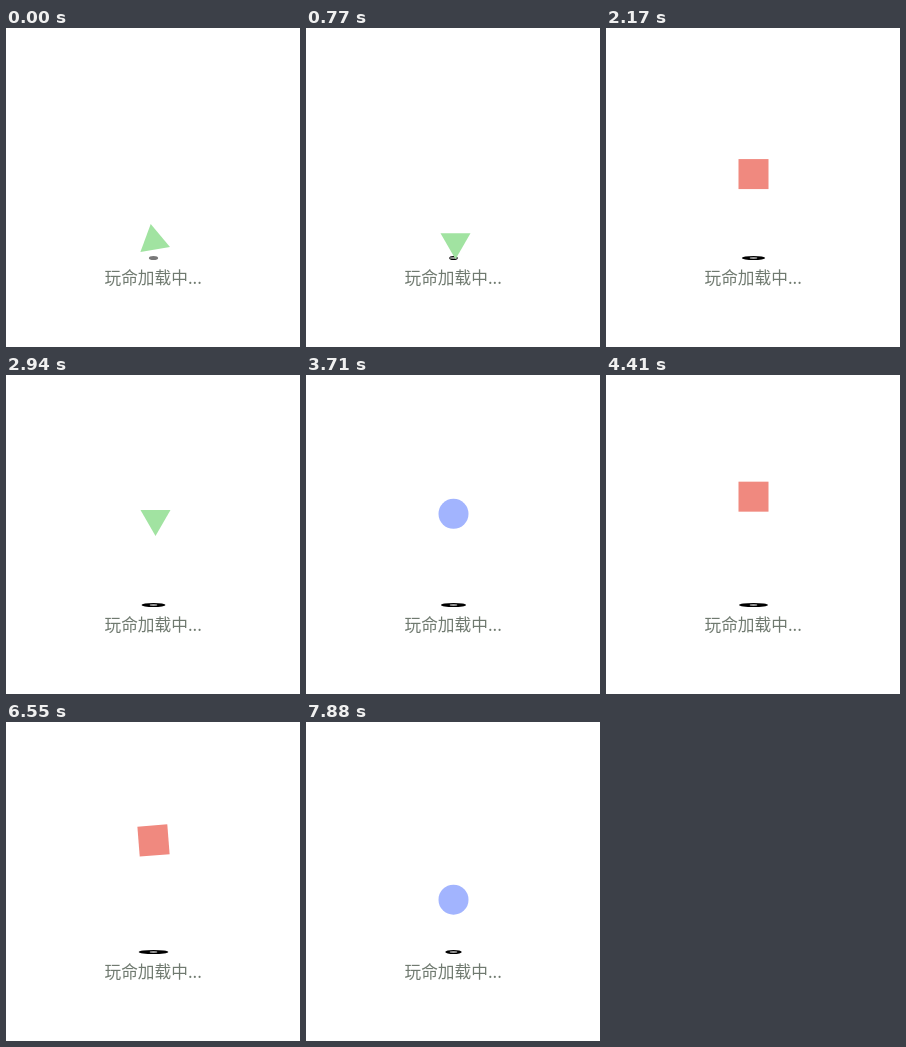
Recreate the animation shown at these times as an HTML page with a canvas. Size 294 px wide and 319 px high, loop 7950 ms.

```html
<!DOCTYPE html>
<html lang="zh-CN">
<head>
<meta charset="utf-8">
<title>玩命加载中</title>
<style>
  html, body { margin: 0; width: 294px; height: 319px; overflow: hidden; background: #fff; }
  canvas, svg { position: absolute; left: 0; top: 0; display: block; }
  text { font: 16.7px "Noto Sans CJK SC", "Noto Sans CJK", "Noto Sans", sans-serif; fill: #707a70; }
</style>
</head>
<body>
<canvas id="stage" width="294" height="319"></canvas>
<svg width="294" height="319"><text x="98.5" y="255.7">玩命加载中...</text></svg>
<script>
const ctx = document.getElementById('stage').getContext('2d');
const LOOP = 7950, STEP = 70;
const CX = 147.5, TOP = 101, DROP = 100, SIZE = 30, POWER = 2.2;

// Turning points in ms: bottom, top, bottom, top, ...
const turns = [-9, 383, 775, 1168, 1558, 1948, 2333, 2723, 3115, 3508, 3905,
  4312, 4677, 5064, 5453, 5843, 6233, 6624, 7024, 7419, 7804, 8194];

function drawTriangle(y, turn) {
  ctx.translate(CX + 1, y + 16.25);
  ctx.rotate(-Math.PI * turn);
  ctx.fillStyle = '#a1e3a1';
  ctx.beginPath();
  ctx.moveTo(-1, -16.25);
  ctx.lineTo(14, 9.75);
  ctx.lineTo(-16, 9.75);
  ctx.fill();
}

function drawCircle(y) {
  ctx.fillStyle = '#a2b4fe';
  ellipse(CX, y + SIZE / 2, SIZE / 2, SIZE / 2);
}

function drawSquare(y, turn) {
  ctx.translate(CX, y + SIZE / 2);
  ctx.rotate(Math.PI * turn);
  ctx.fillStyle = '#f0897f';
  ctx.fillRect(-SIZE / 2, -SIZE / 2, SIZE, SIZE);
}

const shapes = [drawTriangle, drawCircle, drawSquare];

function ellipse(x, y, rx, ry) {
  ctx.beginPath();
  ctx.ellipse(x, y, rx, ry, 0, 0, Math.PI * 2);
  ctx.fill();
}

function drawShadow(fall, step) {
  ctx.fillStyle = `rgba(0,0,0,${1 - Math.pow(0.47, step + 1)})`;
  ellipse(CX, 230, 15 - 11 * fall, 2.1);
  if (step > 0) {
    ctx.fillStyle = '#999';
    ellipse(CX, 230, 3.8, 0.9);
  }
}

function draw(t) {
  let leg = 0;
  while (t >= turns[leg + 1]) leg++;
  const p = (t - turns[leg]) / (turns[leg + 1] - turns[leg]);
  const rising = leg % 2 === 0;
  const fall = Math.pow(rising ? 1 - p : p, POWER);

  ctx.clearRect(0, 0, 294, 319);
  drawShadow(fall, Math.floor(t / STEP));
  ctx.save();
  shapes[(leg >> 1) % 3](TOP + DROP * fall, rising ? 1 - fall : 1);
  ctx.restore();
}

const start = performance.now();
function tick() {
  draw((performance.now() - start) % LOOP);
  requestAnimationFrame(tick);
}
tick();
</script>
</body>
</html>
```
